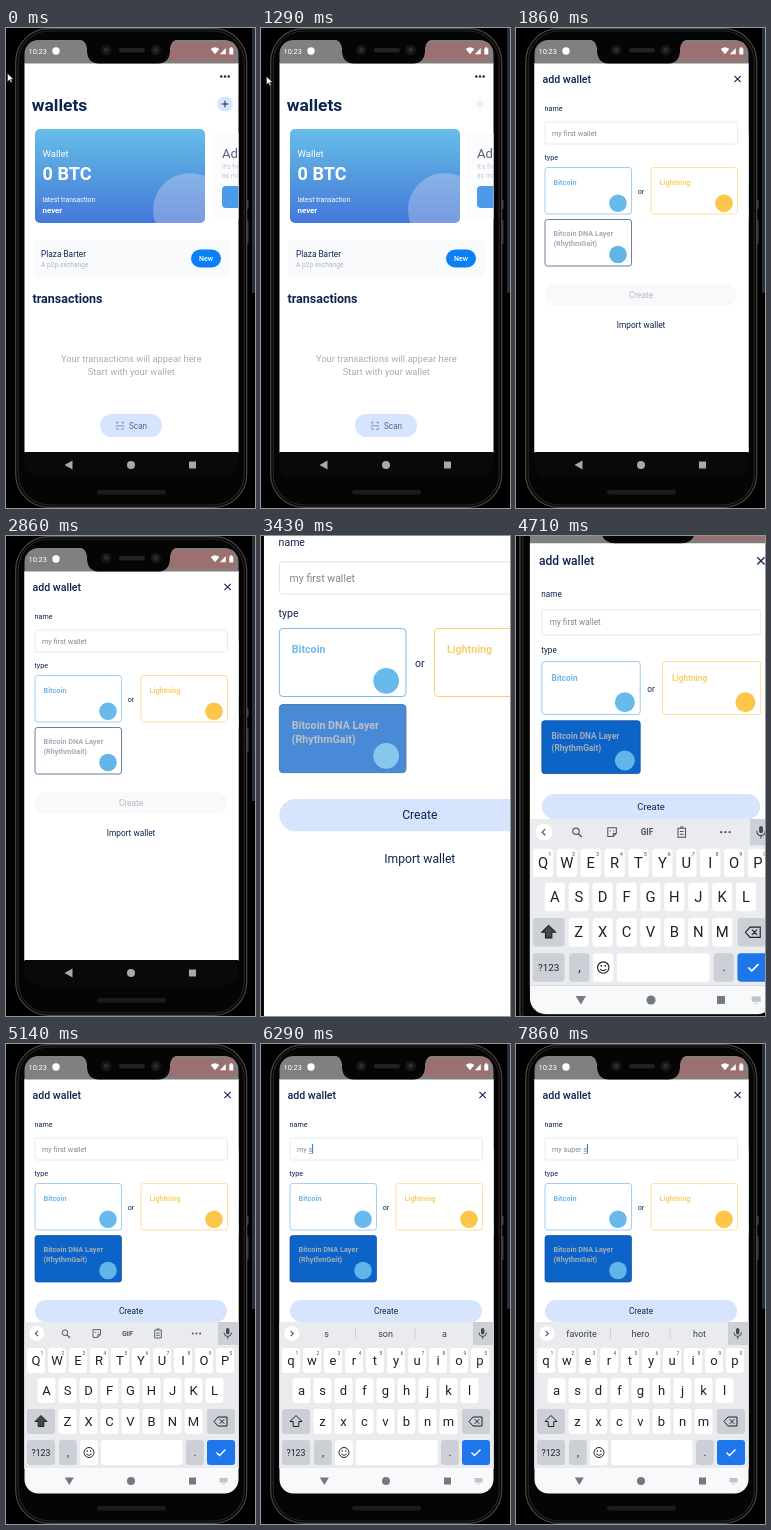
An HTML page for the animation above (8 s loop, 249x480 px).

```html
<!DOCTYPE html>
<html lang="en">
<head>
<meta charset="utf-8">
<title>Add wallet</title>
<style>
html, body { margin: 0; width: 100%; height: 100%; overflow: hidden; background: #000; }
svg { display: block; width: 100%; height: 100%; }
text { font-family: Roboto, sans-serif; white-space: pre; }
</style>
</head>
<body>
<svg id="stage" viewBox="0 0 249 480"></svg>
<script>
const NAVY = '#0c2550', GREY = '#a6abb4', INK = '#202124', KEY_GREY = '#ccd0d6';
const LOOP = 8000, FPS = 7;

const text = (x, y, size, str, fill = NAVY, extra = '') =>
  `<text x="${x}" y="${y}" font-size="${size}" fill="${fill}" ${extra}>${str}</text>`;
const mid = (x, y, size, str, fill, extra = '') =>
  text(x, y, size, str, fill, 'text-anchor="middle" ' + extra);
const box = (x, y, w, h, r, fill, extra = '') =>
  `<rect x="${x}" y="${y}" width="${w}" height="${h}" rx="${r}" fill="${fill}" ${extra}/>`;
const dot = (x, y, r, fill, extra = '') =>
  `<circle cx="${x}" cy="${y}" r="${r}" fill="${fill}" ${extra}/>`;
const line = (d, color, width = 1, extra = '') =>
  `<path d="${d}" fill="none" stroke="${color}" stroke-width="${width}" ${extra}/>`;
const group = (id, body, extra = '') => `<g id="${id}" ${extra}>${body}</g>`;
const BOLD = 'font-weight="700"', MEDIUM = 'font-weight="500"';

function walletsPage() {
  return box(18, 35, 215, 390, 0, '#fff')
    + [215.3, 219, 222.7].map(x => dot(x, 48.5, 1.2, NAVY)).join('')
    + text(25.7, 83.3, 17.4, 'wallets', NAVY, BOLD)
    + group('plus', dot(219, 76, 7.8, '#d8e6fd') + line('M215.7 76h6.6M219 72.7v6.6', NAVY, 1))
    + box(29, 101, 170, 94, 5, 'url(#sky)')
    + dot(184, 182, 37, '#d8d8ee', 'opacity=".36" clip-path="url(#cardClip)"')
    + text(36.5, 129, 9.5, 'Wallet', '#fff')
    + text(36.5, 151.8, 18.1, '0 BTC', '#fff', BOLD)
    + text(36.5, 174, 6.8, 'latest transaction', '#fff')
    + text(36.5, 185, 7.9, 'never', '#fff', BOLD)
    + box(205, 105, 40, 86, 4, '#fbfcfe')
    + text(216, 129.5, 13.2, 'Ad', '#566480')
    + text(216, 141, 6.6, 'It’s free', '#c3c7cf')
    + text(216, 150, 6.6, 'as many', '#c3c7cf')
    + box(216, 158, 40, 22, 4, '#4b9bea')
    + box(27, 212, 197, 37, 4, '#f9fafc')
    + text(35, 229, 8.3, 'Plaza Barter', NAVY)
    + text(35, 239, 6.7, 'A p2p exchange', '#b1b5be')
    + box(185, 221.5, 30, 18, 9, '#0b80f4')
    + mid(200, 233, 7, 'New', '#fff', MEDIUM)
    + text(26.5, 275, 12.5, 'transactions', NAVY, BOLD)
    + mid(125.3, 333.5, 9.35, 'Your transactions will appear here', GREY)
    + mid(125.3, 346.5, 9.35, 'Start with your wallet', GREY)
    + box(94, 386, 62, 23, 11.5, '#d6e4fd')
    + line('M110.8 396v-1.8h2M115.2 394.2h2v1.8M110.8 399.5v1.8h2M115.2 401.3h2v-1.8M109.8 397.8h8.4', '#5d78a8', .7)
    + text(123, 400.8, 8.2, 'Scan', '#4f6898');
}

function addPage() {
  const typeCard = (x, y, color, label) =>
    box(x, y, 86.5, 46.5, 2.5, '#fff', `stroke="${color}" stroke-width=".65"`)
    + text(x + 8.5, y + 17, 7.3, label, color, BOLD);
  return box(18, 35, 215, 390, 0, '#fff')
    + text(26.5, 54.5, 10.6, 'add wallet', NAVY, MEDIUM)
    + line('M218.4 47.8l6.4 6.4M224.8 47.8l-6.4 6.4', NAVY, 1.1)
    + text(28.5, 83, 7.2, 'name')
    + box(29, 94, 192.5, 22, 2, '#fff', 'stroke="#dcdfe6" stroke-width=".65"')
    + text(36, 107.6, 7.2, '', '#81868e', 'id="field"')
    + box(0, 109, 0, .6, 0, '#81868e', 'id="underline"')
    + box(0, 100, .9, 9.5, 0, '#1769b5', 'id="caret"')
    + text(28.5, 132, 7.2, 'type')
    + typeCard(29, 139.5, '#72b8ec', 'Bitcoin') + dot(102, 175.3, 8.8, '#68b9ec')
    + mid(125, 166, 7.2, 'or', NAVY)
    + typeCard(135, 139.5, '#fad06a', 'Lightning') + dot(208, 175.3, 8.8, '#fcc64b')
    + group('layer', box(29, 191.5, 86.5, 46.5, 2.5, '#fff', 'id="layerBox" stroke-width=".65"')
      + text(37.5, 208, 7.3, 'Bitcoin DNA Layer', GREY, BOLD)
      + text(37.5, 217.8, 7.3, '(RhythmGait)', GREY, BOLD)
      + dot(102, 226.5, 8.8, '#62b5e8'))
    + box(29, 256, 192, 22, 11, '', 'id="createBox"')
    + mid(125, 270, 8.3, 'Create', '', 'id="createText"')
    + mid(125, 299.8, 8.3, 'Import wallet', NAVY);
}

function keyboard() {
  const rows = [['qwertyuiop', 30, 316.5], ['asdfghjkl', 40.5, 346.5], ['zxcvbnm', 61.5, 377.5]];
  const key = (x, y, w, fill = '#fff') => box(x, y - 12.5, w, 25, 3, fill);
  let out = box(18, 278, 215, 147, 0, '#e9ebef');
  rows.forEach(([letters, x0, y]) => [...letters].forEach((ch, i) => {
    const x = x0 + i * 21;
    out += key(x - 8.9, y, 17.8) + mid(x, y + 4.5, 13, ch, INK, 'class="letter"');
    if (y < 330) out += mid(x + 6, y - 6, 5, (i + 1) % 10, '#50545a');
  }));
  out += key(21, 377.5, 28, KEY_GREY)
    + `<path id="shift" d="M35 371.5l-6 6h3.2v5h5.6v-5h3.2z" stroke="${INK}" stroke-width="1"/>`
    + key(201, 377.5, 28, KEY_GREY)
    + line('M208 377.5l4-4.5h9v9h-9zM213.7 375.2l4.6 4.6M218.3 375.2l-4.6 4.6', INK, 1)
    + key(21, 408.5, 28, KEY_GREY) + mid(35, 411.7, 8.7, '?123', INK)
    + key(53, 408.5, 17.8, KEY_GREY) + mid(62, 411.5, 11, ',', INK)
    + key(74, 408.5, 17.8) + dot(83, 408.5, 5, 'none', `stroke="${INK}"`)
    + dot(81.3, 407, .8, INK) + dot(84.7, 407, .8, INK) + line('M80.3 410q2.7 2.8 5.4 0', INK, .9)
    + key(95, 408.5, 81.5)
    + key(180, 408.5, 17.8, KEY_GREY) + mid(189, 411.5, 11, '.', INK)
    + key(201, 408.5, 28, '#1f75ea') + line('M210.5 408.5l3 3 6-6', '#fff', 1.4);

  const tone = '#50545a';
  out += dot(30.8, 289.5, 7.5, '#fff')
    + line('', tone, 1.1, 'id="chevron"')
    + group('tools',
      dot(59, 288.7, 2.8, 'none', `stroke="${tone}"`) + line('M61 290.8l3 3', tone, 1.2)
      + line('M87 285.7h7.5v5l-2.7 2.7h-4.8zM94.5 290.7h-2.7v2.7M88.8 288.5h1M91.7 288.5h1', tone, .9)
      + mid(121.4, 292, 7.2, 'GIF', tone, BOLD)
      + line('M148.7 286h6.6v8h-6.6zM150.5 285h3M150.3 289h3.4M150.3 291.3h3.4', tone, .9)
      + [186.7, 190.4, 194.1].map(x => dot(x, 289.5, 1, tone)).join(''))
    + group('words',
      [65.5, 124.5, 183.5].map(x => mid(x, 292.6, 9, '', '#3c4045', 'class="word"')).join('')
      + line('M94.5 284v11M154 284v11', '#c9ccd1', .8))
    + box(212, 278, 21, 23, 0, KEY_GREY)
    + box(220, 284, 3.4, 6.5, 1.7, '#44484d')
    + line('M218 288.5q0 4 3.7 4t3.7-4M221.7 292.5v2.5', '#44484d', 1);
  return out;
}

function navBar(fill, ink, down) {
  return box(18, 424, 215, 26, 0, fill)
    + `<path d="${down ? 'M58.8 433.5h9l-4.5 7.5z' : 'M66.5 432.5v9l-8-4.5z'}" fill="${ink}"/>`
    + dot(125, 437, 4, ink) + box(183, 433.5, 7, 7, 0, ink)
    + (down ? box(213.5, 434, 8, 4.5, .6, '#c0c3c7') + line('M216 440h3', '#c0c3c7', .8) : '');
}

const statusBar = box(18, 11, 215, 24.5, 0, '#808080') + box(163, 14, 66, 19, 0, '#9a7070')
  + text(22.5, 25.8, 7.4, '10:23', '#fff') + dot(50, 23, 3.7, '#fff')
  + '<path d="M204.7 21q4.3-3.4 8.6 0l-4.3 5.3zM213.8 26.3h6v-6.3z" fill="#fff"/>'
  + box(223.3, 20.2, 4, 6.3, .6, '#fff') + box(224.4, 19.2, 1.8, 1.4, 0, '#fff');

const camera = x => dot(x, 22, 5.3, '#161616') + dot(x, 22, 2.4, '#292c30');

document.getElementById('stage').innerHTML = `
<defs>
  <linearGradient id="sky" x2="0" y2="1"><stop stop-color="#66bde6"/><stop offset="1" stop-color="#4478da"/></linearGradient>
  <clipPath id="cardClip">${box(29, 101, 170, 94, 5)}</clipPath>
  <clipPath id="screenClip">${box(18.5, 12, 214, 437.5, 14)}</clipPath>
</defs>` + group('camera',
  box(246, 0, 3, 265, 0, '#27303b')
  + box(240.5, 172, 2, 9, 1, '#444') + box(240.5, 192, 2, 24, 1, '#3a3a3a')
  + box(9.7, .7, 231, 478.6, 33, '#050505', 'stroke="#484848" stroke-width="1.2"')
  + box(12.2, 3, 226, 474, 31, 'none', 'stroke="#242424" stroke-width="1.2"')
  + group('screen',
    walletsPage() + group('add', addPage()) + group('keys', keyboard()) + statusBar
    + group('navDark', navBar('#090909', '#a8a8a8', false)) + group('navLight', navBar('#f8f9fa', '#75787c', true)),
    'clip-path="url(#screenClip)"')
  + '<path d="M72 11Q80 12 81 20v3.5q1 12 12 12h59q11 0 12-12v-3.5q1-8 9-9z" fill="#050505"/>'
  + camera(100.3) + camera(149.7) + box(113, 20, 26, 4.5, 2.2, '#222')
  + box(91, 462, 69, 4.5, 2.2, '#1b1b1b'))
  + group('pointer', '<path d="M0 0v8.2l2-1.9 1.4 3 1.3-.6-1.4-2.9h2.7z" fill="#fff" stroke="#222" stroke-width=".5"/>');

// Start time, field content, suggestions
const typing = [
  [0, ''],
  [5430, 'm', 'm my me'],
  [5710, 'my', 'my mu m'],
  [5860, 'my ', 'name own phone'],
  [6140, 'my s', 's son a'],
  [6430, 'my su', 'su sure super'],
  [6710, 'my sup', 'sup super support'],
  [7000, 'my supe', 'supe super superb'],
  [7290, 'my super', 'super superb supper'],
  [7570, 'my super ', 'favorite hero hot'],
  [7860, 'my super s', 'favorite hero hot']
];

const $ = id => document.getElementById(id);
const letters = [...document.querySelectorAll('.letter')];
const words = [...document.querySelectorAll('.word')];
const set = (id, attrs) => Object.entries(attrs).forEach(([k, v]) => $(id).setAttribute(k, v));
const show = (id, on) => set(id, { visibility: on ? 'visible' : 'hidden' });
const progress = (t, start, span) => Math.min(1, Math.max(0, (t - start) / span));
const easeInOut = p => p < .5 ? 4 * p ** 3 : 1 - 4 * (1 - p) ** 3;
const easeOut = p => 1 - (1 - p) ** 3;

function renderField(t) {
  const [, value, hints = ''] = typing.filter(step => step[0] <= t).pop();
  const typed = value !== '', field = $('field');
  field.textContent = value || 'my first wallet';
  show('caret', typed);
  show('underline', typed && !value.endsWith(' '));
  if (typed) {
    const start = value.lastIndexOf(' ') + 1;
    const end = field.getComputedTextLength();
    const left = start ? field.getSubStringLength(0, start) : 0;
    set('caret', { x: 36 + end });
    set('underline', { x: 36 + left, width: Math.max(0, end - left) });
  }
  words.forEach((word, i) => word.textContent = hints.split(' ')[i] || '');
  letters.forEach(el => el.textContent = typed ? el.textContent.toLowerCase() : el.textContent.toUpperCase());
  set('shift', { fill: typed ? 'none' : '#44484d' });
  set('chevron', { d: typed ? 'M29.6 286.8l2.7 2.7-2.7 2.7' : 'M32 286.8l-2.7 2.7 2.7 2.7' });
  show('tools', !typed);
  show('words', typed);
}

function render(t) {
  const drift = progress(t, 0, 1286);
  set('pointer', { transform: `translate(${1.5 + 4 * drift} ${45.5 + 3 * drift})` });
  show('pointer', t < 1560);
  set('plus', { opacity: t >= 1140 && t < 1560 ? .15 : 1 });

  const enter = easeOut(progress(t, 1430, 430));
  set('add', { opacity: enter, transform: `translate(0 ${(1 - enter) * 40})` });

  const chosen = t >= 3420;
  set('layer', { opacity: t < 3280 ? 1 : chosen ? .75 + .25 * progress(t, 3430, 130) : .2 });
  set('layerBox', { fill: chosen ? '#0c64c8' : '#fff', stroke: chosen ? '#0d4a96' : '#26366a' });
  set('createBox', { fill: chosen ? '#d6e4fd' : '#f8f9fb' });
  set('createText', { fill: chosen ? NAVY : '#b4b8c0' });

  const rise = easeOut(progress(t, 4140, 290));
  set('keys', { transform: `translate(0 ${(1 - rise) * 147})` });
  show('keys', rise > 0);
  show('navLight', rise > 0);

  const zoom = 1 + .5 * (easeInOut(progress(t, 2860, 774)) - easeInOut(progress(t, 4253, 774)));
  set('camera', { transform: `translate(52 241) scale(${zoom}) translate(-52 -241)` });
  renderField(t);
}

let lastStep = -1;
function tick() {
  const step = Math.floor((performance.now() % LOOP + 5) * FPS / 1000) % (LOOP * FPS / 1000);
  if (step !== lastStep) render(Math.round(step * 100 / FPS) * 10);
  lastStep = step;
  requestAnimationFrame(tick);
}
tick();
</script>
</body>
</html>
```
